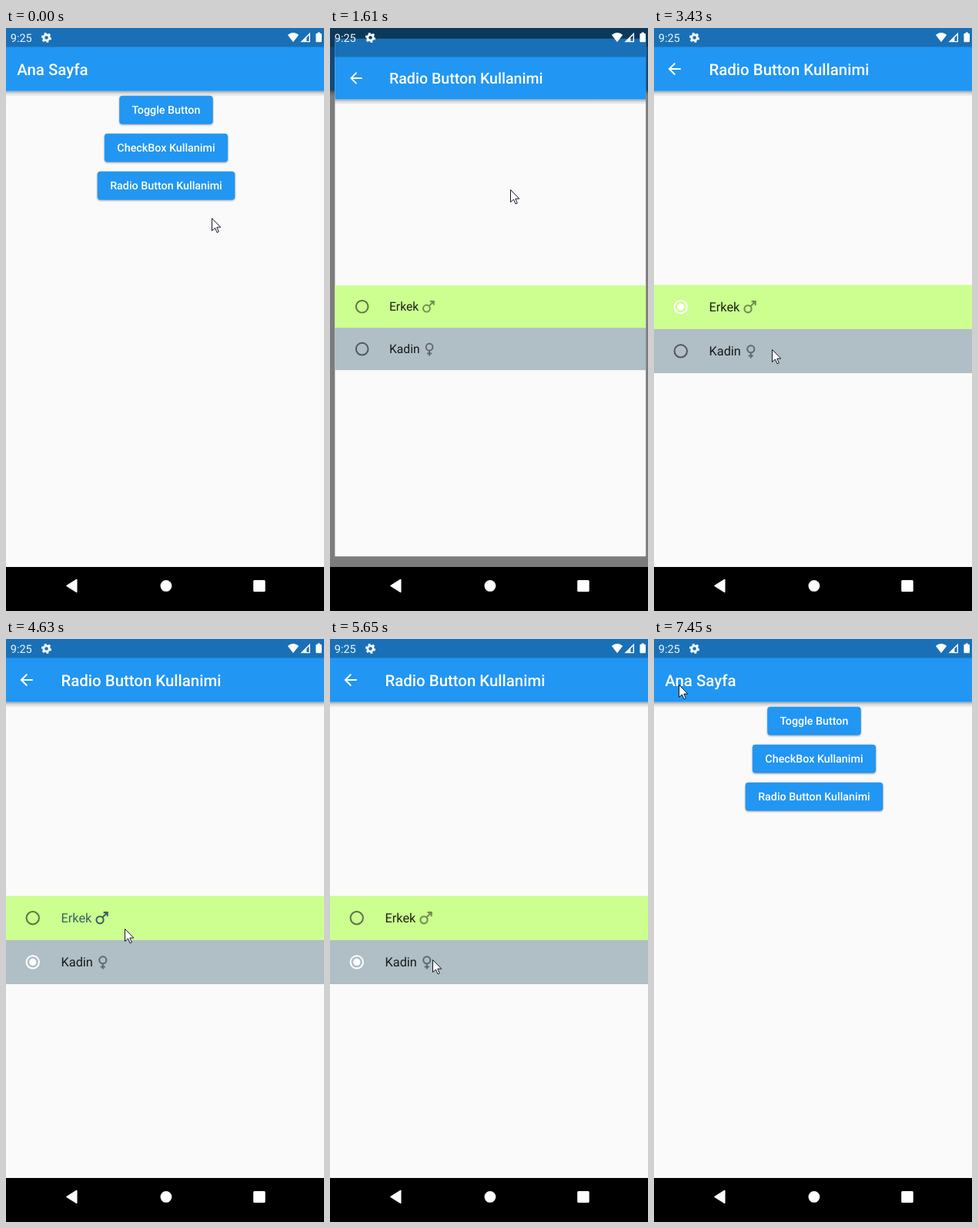
Write an HTML page that moves like this. It is 413 by 755 pixels and loops after 8.05 s.

```html
<!DOCTYPE html>
<html lang="tr">
<head>
<meta charset="utf-8">
<title>Radio Button</title>
<style>
html, body { margin: 0; width: 100%; height: 100%; overflow: hidden; background: #fafafa; }
svg { display: block; width: 413px; height: 755px; }
text { font-family: Roboto, sans-serif; text-rendering: geometricPrecision; }
.title { font-size: 20px; font-weight: 500; fill: #fff; }
.button rect { fill: #2196f3; filter: drop-shadow(0 1.5px 1.3px rgba(0,0,0,.36)); }
.button text { font-size: 14px; font-weight: 500; fill: #fff; text-anchor: middle; }
.row text { font-size: 16px; fill-opacity: .87; }
.ring { fill: none; stroke: #000; stroke-opacity: .54; stroke-width: 2; }
.dot { fill: none; }
.on .ring { stroke: #fff; stroke-opacity: 1; }
.on .dot { fill: #fff; }
.sign { fill: none; stroke: #000; stroke-opacity: .45; stroke-width: 2; }
.tint text { fill: #1f4a58; }
.tint .sign { stroke: #1f4a58; stroke-opacity: .87; }
</style>
</head>
<body>
<svg viewBox="0 0 413 755">
  <defs>
    <linearGradient id="shade" x2="0" y2="1">
      <stop stop-opacity=".34"/><stop offset=".4" stop-opacity=".14"/><stop offset="1" stop-opacity="0"/>
    </linearGradient>
    <g id="page">
      <rect width="412" height="684" fill="#fafafa"/>
      <rect y="80" width="412" height="7" fill="url(#shade)"/>
      <rect width="412" height="80" fill="#2196f3"/>
      <rect width="412" height="24" fill="#1970b6"/>
    </g>
    <clipPath id="buttonClip"><rect x="118" y="182" width="175" height="36" rx="4"/></clipPath>
    <clipPath id="rowClip"><rect width="412" height="56"/></clipPath>
  </defs>

  <!-- app screen in density-independent units -->
  <g transform="translate(-2) scale(1.0208)">
    <g id="home">
      <use href="#page"/>
      <text class="title" x="16" y="59.6">Ana Sayfa</text>
      <g class="button"><rect x="146.200" y="86" width="119" height="36" rx="4"/><text x="205.700" y="108.800">Toggle Button</text></g>
      <g class="button"><rect x="127.200" y="134" width="157" height="36" rx="4"/><text x="205.700" y="156.800">CheckBox Kullanimi</text></g>
      <g class="button">
        <rect x="118.200" y="182" width="175" height="36" rx="4"/>
        <g id="press" clip-path="url(#buttonClip)" fill="#fff">
          <path d="M118 182h176v36h-176z" fill-opacity=".07"/>
          <circle cx="231" cy="207" r="29" fill-opacity=".17"/>
        </g>
        <text x="205.700" y="204.800">Radio Button Kullanimi</text>
      </g>
    </g>
    <rect id="scrim" width="412" height="684" fill-opacity=".5"/>

    <g id="detail">
      <use href="#page"/>
      <path transform="translate(16 40)" fill="#fff" d="M20 11H7.830l5.590-5.590L12 4l-8 8 8 8 1.410-1.410L7.830 13H20z"/>
      <text class="title" x="72" y="59.6">Radio Button Kullanimi</text>
      <g class="row" transform="translate(0 325.9)">
        <rect width="412" height="56" fill="#ccff90"/>
        <g clip-path="url(#rowClip)">
          <rect id="glow" width="412" height="56" fill-opacity=".03"/>
          <circle id="splash" cx="153" cy="40" r="71" fill-opacity=".08"/>
        </g>
        <circle class="ring" cx="36" cy="28" r="8"/><circle class="dot" cx="36" cy="28" r="4.5"/>
        <text x="72" y="33.5">Erkek</text>
        <path class="sign" transform="translate(112 16)" d="M5 14.500a4.500 4.500 0 1 0 9 0a4.500 4.500 0 1 0-9 0M12.700 11.300L18.500 5.500M14 5h5v5"/>
      </g>
      <g class="row" transform="translate(0 381.9)">
        <rect width="412" height="56" fill="#b0bec5"/>
        <circle class="ring" cx="36" cy="28" r="8"/><circle class="dot" cx="36" cy="28" r="4.5"/>
        <text x="72" y="33.5">Kadin</text>
        <path class="sign" transform="translate(113.2 16)" d="M7.500 9.500a4.500 4.500 0 1 0 9 0a4.500 4.500 0 1 0-9 0M12 14v7M9 18h6"/>
      </g>
    </g>
  </g>

  <!-- system bars -->
  <g fill="#fff">
    <text x="5.800" y="18" font-size="14.5" fill-opacity=".93">9:25</text>
    <g transform="translate(52.500 12.500)" fill="none" stroke="#fff">
      <circle r="3.700" stroke-width="2.800"/>
      <circle r="5.600" stroke-width="2" pathLength="6" stroke-dasharray=".5"/>
    </g>
    <path d="M373 18.200L365.800 9q7.200-6 14.400 0z"/>
    <path d="M395 5.800v12.400h-12.600zM393.600 9.200l-3.200 3.200v4.500h3.200z" fill-rule="evenodd"/>
    <rect x="402.400" y="7" width="7.600" height="11.300" rx="1"/><rect x="404.600" y="5.600" width="3.200" height="2"/>
  </g>
  <rect y="698" width="413" height="57"/>
  <g fill="#fff">
    <path d="M79 722.400L91.700 714.500v15.800z" stroke="#fff" stroke-width="1.600" stroke-linejoin="round"/>
    <circle cx="207.900" cy="722.400" r="7.400"/>
    <rect x="321.200" y="714.900" width="15.500" height="15" rx="1.500"/>
  </g>
  <path id="cursor" d="M.5 .5v16l4-3.500 2.500 5.800 2.300-1-2.500-5.700h5z" fill="#fff" stroke="#12182a"/>
  <circle id="click" cx="32" cy="59" r="12" fill="#ff0" fill-opacity=".46"/>
</svg>
<script>
const LOOP = 8050, BEATS = 40;
const $ = id => document.getElementById(id);
const rows = document.querySelectorAll('.row');

// pointer glides: [first beat, last beat, x, y]
const glides = [
  [0, 4, 234, 209], [10, 13, 158, 360], [14, 16, 153, 416], [16, 20, 153, 419],
  [21, 23, 154, 375], [24, 27, 133, 415], [28, 32, 32, 59]
];
const taps = [14, 18, 24, 28]; // alternate between the two options

const show = (id, on) => $(id).style.display = on ? '' : 'none';

function pointer(beat) {
  let x = 267, y = 246;
  for (const [a, b, tx, ty] of glides) {
    const u = Math.min(1, Math.max(0, (beat - a) / (b - a)));
    const ease = u * u * (3 - 2 * u);
    x += (tx - x) * ease;
    y += (ty - y) * ease;
  }
  return `translate(${Math.round(x)} ${Math.round(y)})`;
}

function draw(t) {
  // the screen refreshes about five times a second
  const beat = Math.min(BEATS - 1, Math.floor((t + 20) * BEATS / LOOP));
  const during = (a, b) => beat >= a && beat < b;
  const count = taps.filter(b => b <= beat).length;
  const opening = beat === 8;

  $('cursor').setAttribute('transform', pointer(beat));
  show('press', beat === 7);
  show('scrim', opening);
  show('detail', during(8, 37));
  $('detail').setAttribute('transform',
    opening ? 'translate(205.7 342) scale(.96) translate(-205.7 -342)' : '');
  show('glow', beat === 14);
  show('splash', beat === 14 || beat === 24);
  show('click', beat === 35);
  rows.forEach((row, i) => row.classList.toggle('on', count > 0 && (count - 1) % 2 === i));
  rows[0].classList.toggle('tint', beat === 23);
}

const start = performance.now();
function tick() {
  draw((performance.now() - start) % LOOP);
  requestAnimationFrame(tick);
}
tick();
</script>
</body>
</html>
```
